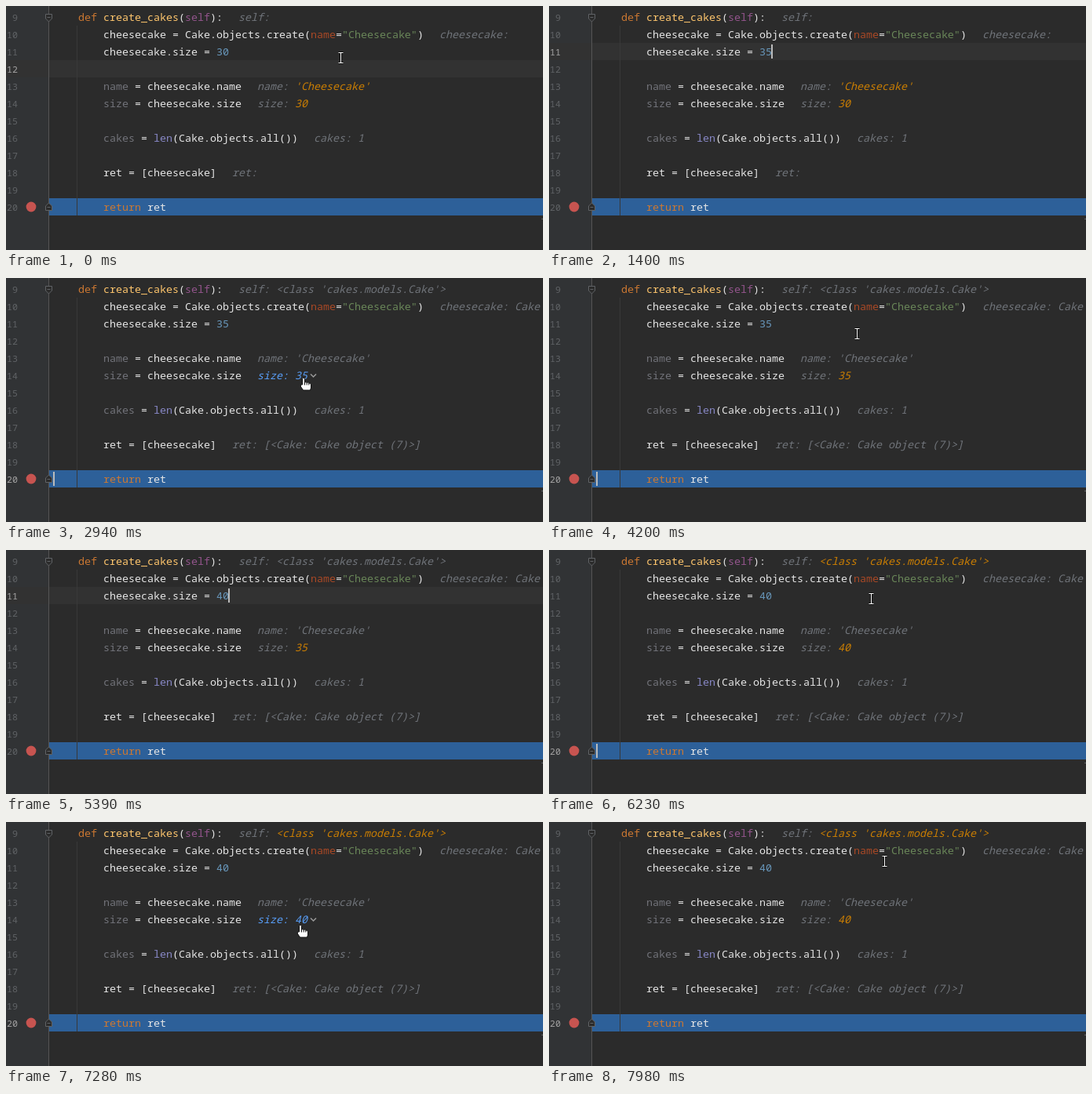
These frames come from a looping animation (684x311 px, 8 s). An HTML page:

```html
<!DOCTYPE html>
<html lang="en">
<head>
<meta charset="utf-8">
<title>Debugger inline values</title>
<style>
  html, body { margin: 0; width: 100%; height: 100%; overflow: hidden; background: #2b2b2b; }
  svg { display: block; width: 684px; height: 311px; }
  text { font: 13.33px "Noto Sans Mono", "DejaVu Sans Mono", monospace; white-space: pre; fill: #e6e6e6; }
  .num { font-size: 11.67px; fill: #606366; }
  .num.on { fill: #a4a3a3; }
  .key { fill: #cc7832; }
  .fn { fill: #ffc66d; }
  .self { fill: #94558d; }
  .arg { fill: #aa4926; }
  .str { fill: #6a8759; }
  .int { fill: #6897bb; }
  .builtin { fill: #8888c6; }
  .dim { fill: #72737a; }
  .hint { font-style: italic; fill: #70747a; }
  .changed { fill: #ca7e03; }
  .hover, .hover .changed { fill: #589df6; }
  .line { fill: none; stroke: #606366; }
</style>
</head>
<body>
<svg viewBox="0 0 684 311">
  <rect width="684" height="311" fill="#2b2b2b"/>
  <rect width="55" height="311" fill="#313335"/>
  <rect id="currentRow" width="684" height="22" fill="#323232"/>
  <path d="M54.5 0V311" stroke="#555"/>
  <rect x="55" y="245" width="629" height="22" fill="#2d6099"/>
  <path d="M90.5 25V267" stroke="#393939"/>
  <rect id="selection" x="268" y="47" width="16" height="22" fill="#214283"/>
  <circle cx="32" cy="256" r="6.4" fill="#c75450"/>
  <g class="line">
    <path fill="#2b2b2b" d="M50.5 10.5H58.5V16L54.5 20L50.5 16ZM52.5 14.5H56.5"/>
    <path fill="#2b2b2b" d="M50.5 260.5H58.5V255L54.5 251L50.5 255ZM52.5 256.5H56.5"/>
    <path d="M682 271.5H684"/>
  </g>
  <g id="code"></g>
  <path id="chevron" fill="none" stroke="#9a9a9a" stroke-width="1.5" d="M4 0l3.5 3.5L11 0"/>
  <rect id="caret" width="2" height="18" fill="#bbb"/>
  <g id="beam" fill="none">
    <path stroke="#111" stroke-width="3" d="M-3-6.5H3M-3 6.5H3M0-6.5V6.5"/>
    <path stroke="#fff" d="M-3-6.5H3M-3 6.5H3M0-6.5V6.5"/>
  </g>
  <g id="hand" fill="#fff" stroke="#111">
    <path d="M-1.5 8V.5Q0-2 1.5 .5V5Q3 4 4.2 5.5Q5.7 4.5 6.8 6Q9.5 5.5 9.5 8V12L8.5 15H-.5L-3.8 10Q-4 7-1.5 8Z"/>
    <path d="M1.5 5V8.5M4.2 5.5V8.5M6.8 6V8.5"/>
  </g>
</svg>
<script>
const LOOP = 8000, TICK = 70, COL = 8, LEFT = 60;
const $ = id => document.getElementById(id);
const rowTop = line => 3 + (line - 9) * 22;

function addText(x, line, cls = "") {
  const el = document.createElementNS("http://www.w3.org/2000/svg", "text");
  el.setAttribute("x", x);
  el.setAttribute("y", rowTop(line) + 16);
  el.setAttribute("class", cls);
  $("code").append(el);
  return el;
}

// Tokens are plain strings or [class, string] pairs.
function fill(el, tokens) {
  el.replaceChildren(...tokens.map(token => {
    const [cls, str] = Array.isArray(token) ? token : ["", token];
    const span = document.createElementNS("http://www.w3.org/2000/svg", "tspan");
    if (cls) span.setAttribute("class", cls);
    span.textContent = str;
    return span;
  }));
}

const source = {
  9: [["key", "def "], ["fn", "create_cakes"], "(", ["self", "self"], "):"],
  10: ["cheesecake = Cake.objects.create(", ["arg", "name"], "=", ["str", '"Cheesecake"'], ")"],
  11: ["cheesecake.size = ", ["int", "30"]],
  13: [["dim", "name"], " = cheesecake.name"],
  14: [["dim", "size"], " = cheesecake.size"],
  16: [["dim", "cakes"], " = ", ["builtin", "len"], "(Cake.objects.all())"],
  18: ["ret = [cheesecake]"],
  20: [["key", "return "], "ret"]
};
const numbers = {}, codeRows = {}, hints = {};
for (let line = 9; line <= 20; line++) {
  numbers[line] = addText(line < 10 ? 8 : 1, line, "num");
  numbers[line].textContent = line;
  if (!source[line]) continue;
  codeRows[line] = addText(LEFT + COL * (line === 9 ? 4 : 8), line);
  fill(codeRows[line], source[line]);
}
const hintX = { 9: 296, 10: 552, 13: 320, 14: 320, 16: 392, 18: 288 };
for (const line in hintX) hints[line] = addText(hintX[line], +line, "hint");

// Each track lists [start, value...]; a value holds until the next start.
const sizeTrack = [[0, "30"], [1120, "3"], [1330, "35"], [5040, "4"], [5390, "40"]];
const lineTrack = [[0, 12], [280, 11], [1820, 20], [4410, 11], [6090, 20]];
const selectTrack = [[0, false], [840, true], [1120, false], [4550, true], [5040, false]];
const caretTrack = [
  [0, false], [280, true], [2380, false], [2730, true], [3080, false], [3430, true],
  [3780, false], [4130, true], [6580, false], [6930, true], [7280, false], [7700, true], [7980, false]
];
// [start, self, other values, name, size]; "changed" marks a new value
const hintTrack = [
  [0, "", false, "changed", "30"],
  [1890, "", false, "", "35"],
  [1960, "", true, "", "35"],
  [6160, "", false, "", "40"],
  [6230, "changed", true, "", "40"]
];
const hoverTrack = [[0, 0], [2870, 14], [4060, 0], [6790, 14], [7770, 13], [7840, 0]];

// A run gives one pointer position per tick from its start.
const run = (start, shape, ...points) => points.map(([x, y], i) => [start + i * TICK, shape, x, y]);
const pointerTrack = [
  [0, "beam", 426, 66], [1120, "beam", 425, 66], [1400, ""],
  ...run(2170, "beam", [427, 68], [434, 78], [447, 118], [451, 140], [446, 149], [436, 151], [424, 148], [408, 144], [391, 140]),
  ...run(2870, "hand", [382, 129], [379, 128]),
  [3220, "hand", 377, 128], [3360, "hand", 376, 128], [3430, "hand", 375, 129],
  ...run(3570, "hand", [374, 130], [373, 130]),
  [3990, "hand", 376, 120],
  ...run(4060, "beam", [382, 86], [388, 77], [392, 71], [396, 66], [396, 63], [396, 62]),
  [5110, ""],
  ...run(5670, "beam", [399, 63], [400, 66]),
  ...run(6090, "beam", [403, 65], [407, 63], [410, 62], [412, 66], [414, 74], [410, 88], [402, 116], [394, 140], [388, 144], [382, 142]),
  ...run(6790, "hand", [379, 136], [376, 133], [375, 133], [375, 132]),
  ...run(7700, "hand", [384, 120], [402, 100]),
  ...run(7840, "beam", [414, 82], [423, 62], [427, 50])
];
const at = (track, t) => track.findLast(entry => entry[0] <= t);
const show = (el, on) => el.setAttribute("visibility", on ? "visible" : "hidden");
const move = (el, x, y) => el.setAttribute("transform", `translate(${x} ${y})`);

function drawHints(t) {
  const [, self, values, name, size] = at(hintTrack, t);
  const hovered = at(hoverTrack, t)[1];
  const value = str => values ? " " + str : "";
  fill(hints[9], ["self:", [self, value("<class 'cakes.models.Cake'>")]]);
  fill(hints[10], ["cheesecake:" + value("Cake")]);
  fill(hints[13], ["name: ", [name, "'Cheesecake'"]]);
  fill(hints[14], ["size: ", ["changed", size]]);
  fill(hints[16], ["cakes: 1"]);
  fill(hints[18], ["ret:" + value("[<Cake: Cake object (7)>]")]);
  for (const line in hints) hints[line].classList.toggle("hover", +line === hovered);
  show($("chevron"), hovered);
  if (hovered) move($("chevron"), hovered === 13 ? 464 : 384, rowTop(hovered) + 9.5);
}

function draw(t) {
  const line = at(lineTrack, t)[1], size = at(sizeTrack, t)[1];
  const [, shape, x, y] = at(pointerTrack, t);
  fill(codeRows[11], ["cheesecake.size = ", ["int", size]]);
  for (const n in numbers) numbers[n].classList.toggle("on", +n === line);
  show($("currentRow"), line !== 20);
  move($("currentRow"), 0, rowTop(line));
  show($("selection"), at(selectTrack, t)[1]);
  show($("caret"), at(caretTrack, t)[1]);
  move($("caret"), line === 11 ? 267 + COL * size.length : LEFT, rowTop(line) + 2);
  drawHints(t);
  for (const id of ["beam", "hand"]) {
    show($(id), shape === id);
    if (shape === id) move($(id), id === "beam" ? x + 0.5 : x, y);
  }
}

let lastTick = -1;
function frame() {
  const t = performance.now() % LOOP, tick = Math.floor(t / 10);
  if (tick !== lastTick) draw(t);
  lastTick = tick;
  requestAnimationFrame(frame);
}
frame();
</script>
</body>
</html>
```
